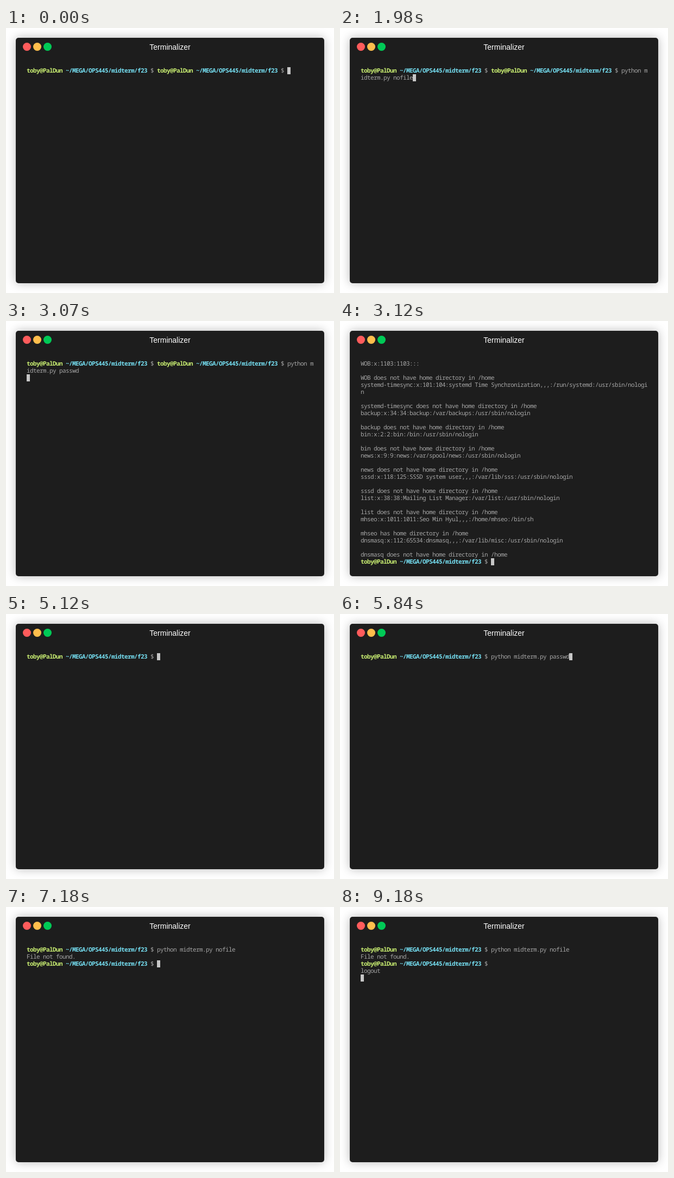
An HTML page that plays this animation: 604 by 487 pixels, repeating every 9590 ms.

```html
<!DOCTYPE html>
<html lang="en">
<head>
<meta charset="utf-8">
<title>Terminal session</title>
<style>
  html, body { margin: 0; width: 100%; height: 100%; overflow: hidden; background: #fff; }
  .window {
    position: absolute; left: 18px; top: 18px; width: 568px; height: 451px;
    background: #1d1d1d; border-radius: 5px; box-shadow: 0 0 18px rgba(0, 0, 0, .28);
  }
  svg { position: absolute; left: 0; top: 0; }
  .title { font: 14px "Liberation Sans", Arial, sans-serif; fill: #fff; text-anchor: middle; }
  #screen text {
    font: 11px "Noto Sans Mono", "DejaVu Sans Mono", monospace;
    white-space: pre; text-rendering: geometricPrecision;
  }
  #screen .plain { fill: #a6a6a6; }
  #screen .user { fill: #c8ed71; font-weight: bold; }
  #screen .path { fill: #75dff2; font-weight: bold; }
</style>
</head>
<body>
<div class="window"></div>
<svg width="604" height="487" viewBox="0 0 604 487">
  <circle cx="38.5" cy="34.5" r="7.5" fill="#ff5c5c"/>
  <circle cx="57.5" cy="34.5" r="7.5" fill="#ffbe4c"/>
  <circle cx="76.5" cy="34.5" r="7.5" fill="#00ca56"/>
  <text class="title" x="302" y="40">Terminalizer</text>
  <g id="screen"></g>
  <rect id="cursor" width="6" height="13" fill="#c7c7c7"/>
</svg>
<script>
const LOOP = 9590;
const COLS = 88, CELL_W = 6, CELL_H = 13, LEFT = 38, TOP = 72, BASELINE = 10;

const PROMPT = [
  ["user", "toby@PalDun"], ["plain", " "],
  ["path", "~/MEGA/OPS445/midterm/f23"], ["plain", " $ "]
];

const entry = (name, rest, has = "does not have") =>
  `${name}:x:${rest}\n\n${name} ${has} home directory in /home\n`;

const listing = [
  entry("WOB", "1103:1103:::"),
  entry("systemd-timesync", "101:104:systemd Time Synchronization,,,:/run/systemd:/usr/sbin/nologin"),
  entry("backup", "34:34:backup:/var/backups:/usr/sbin/nologin"),
  entry("bin", "2:2:bin:/bin:/usr/sbin/nologin"),
  entry("news", "9:9:news:/var/spool/news:/usr/sbin/nologin"),
  entry("sssd", "118:125:SSSD system user,,,:/var/lib/sss:/usr/sbin/nologin"),
  entry("list", "38:38:Mailing List Manager:/var/list:/usr/sbin/nologin"),
  entry("mhseo", "1011:1011:Seo Min Hyul,,,:/home/mhseo:/bin/sh", "has"),
  entry("dnsmasq", "112:65534:dnsmasq,,,:/var/lib/misc:/usr/sbin/nologin")
].join("");

// "§" stands for one shell prompt
const run = "python midterm.py ";
const failed = `§${run}nofile\nFile not found.\n§`;
const steps = [
  [0, "§§"],
  [1980, `§§${run}nofile`],
  [2430, `§§${run}passwd`],
  [3070, `§§${run}passwd\n`],
  [3120, `${listing}§`],
  [5120, "§"],
  [5840, `§${run}passwd`],
  [6570, `§${run}nofile`],
  [7130, `§${run}nofile\n`],
  [7180, failed],
  [9180, `${failed}\nlogout\n`]
];

const screen = document.getElementById("screen");
const cursor = document.getElementById("cursor");

function addText(kind, str, col, row) {
  const node = document.createElementNS("http://www.w3.org/2000/svg", "text");
  node.setAttribute("class", kind);
  node.setAttribute("x", [...str].map((_, i) => LEFT + (col + i) * CELL_W).join(" "));
  node.setAttribute("y", TOP + row * CELL_H + BASELINE);
  node.textContent = str;
  screen.append(node);
}

function draw(content) {
  screen.replaceChildren();
  let col = 0, row = 0;

  function write(kind, str) {
    while (str) {
      if (col === COLS) { col = 0; row++; }
      const part = str.slice(0, COLS - col);
      if (part.trim()) addText(kind, part, col, row);
      col += part.length;
      str = str.slice(part.length);
    }
  }

  for (const token of content.match(/§|\n|[^§\n]+/g)) {
    if (token === "\n") { col = 0; row++; }
    else if (token === "§") PROMPT.forEach(([kind, str]) => write(kind, str));
    else write("plain", token);
  }
  cursor.setAttribute("x", LEFT + col * CELL_W);
  cursor.setAttribute("y", TOP + row * CELL_H);
}

let shown = null;
function update(now) {
  const t = now % LOOP;
  const step = steps.findLast(([start]) => start <= t);
  if (step !== shown) {
    shown = step;
    draw(step[1]);
  }
}

const start = performance.now();
function tick() {
  update(performance.now() - start);
  requestAnimationFrame(tick);
}
tick();
</script>
</body>
</html>
```
